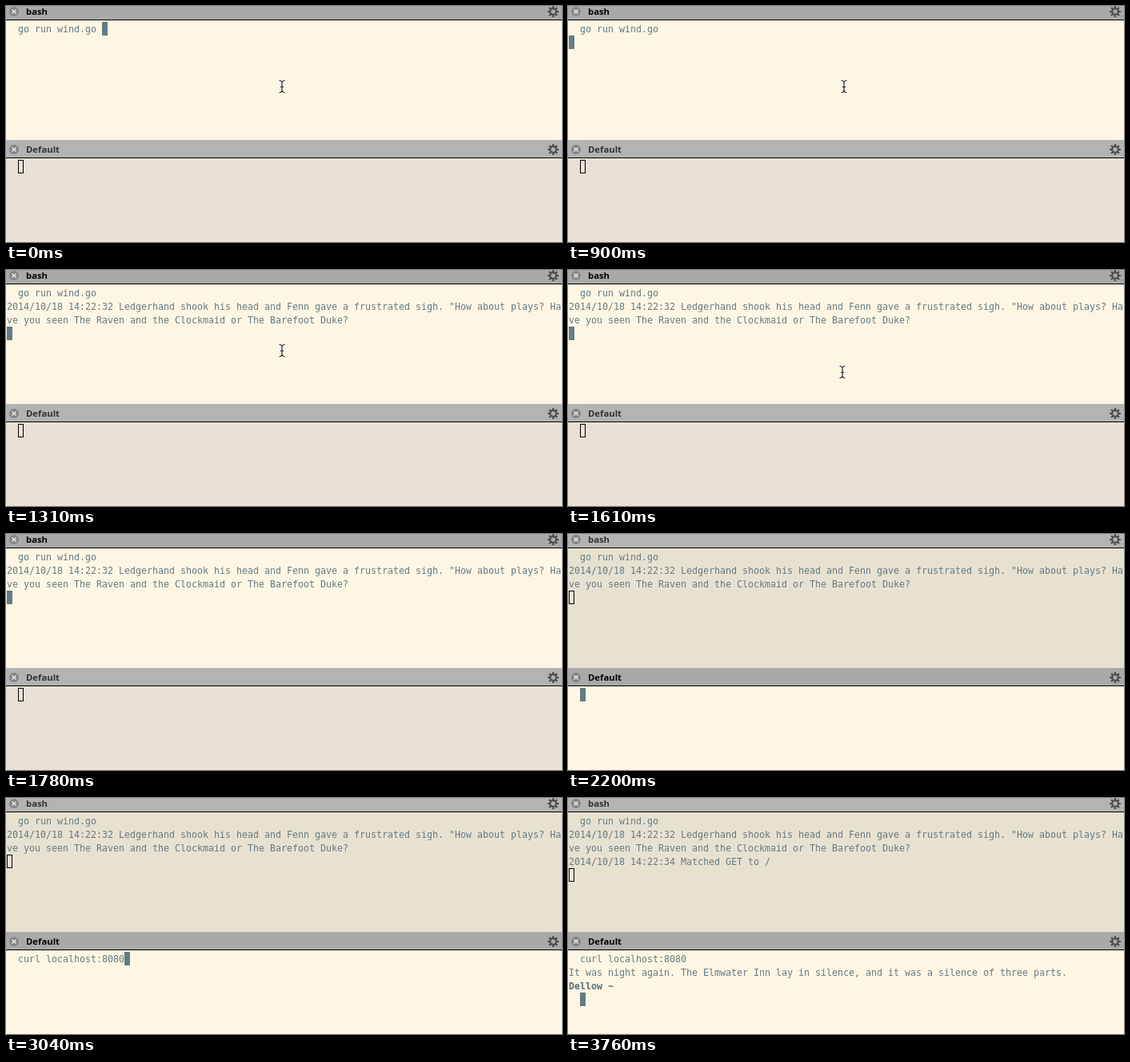
An HTML page with a canvas for the animation above (8.53 s loop, 695 by 296 pixels).

```html
<!DOCTYPE html>
<html lang="en">
<head>
<meta charset="utf-8">
<title>Two terminals</title>
<style>
html, body { margin: 0; width: 100%; height: 100%; overflow: hidden; }
canvas { display: block; }
</style>
</head>
<body>
<canvas id="stage" width="695" height="296"></canvas>
<script>
const LOOP = 8530, WIDTH = 695, CELL = 7, ROW = 17;
const MONO = '11.63px "DejaVu Sans Mono", monospace';
const INK = '#657b83';
const ctx = document.getElementById('stage').getContext('2d');

const LOG = [
  '2014/10/18 14:22:32 Ledgerhand shook his head and Fenn gave a frustrated sigh. "How about plays? Ha',
  've you seen The Raven and the Clockmaid or The Barefoot Duke?'
];
const MATCH = '2014/10/18 14:22:34 Matched GET to /';
const REPLY = 'It was night again. The Elmwater Inn lay in silence, and it was a silence of three parts.';

// Mouse positions by start time; null hides the pointer
const MOUSE = [
  [0, [345, 101]], [1610, [343, 128]], [1667, [339, 205]],
  [1723, [335, 261]], [1780, null]
];

function rect(x, y, w, h, color) {
  ctx.fillStyle = color;
  ctx.fillRect(x, y, w, h);
}

function text(str, x, y, font, color) {
  ctx.font = font;
  ctx.fillStyle = color;
  ctx.fillText(str, x, y);
}

function closeButton(x, y) {
  ctx.fillStyle = '#858585';
  ctx.beginPath();
  ctx.arc(x, y, 6, 0, 7);
  ctx.fill();
  ctx.strokeStyle = '#eee';
  ctx.lineWidth = 1.4;
  ctx.stroke(new Path2D(`M${x - 2.6} ${y - 2.6}l5.2 5.2m0 -5.2l-5.2 5.2`));
}

function gear(x, y) {
  ctx.strokeStyle = '#4c4c4c';
  ctx.lineWidth = 2.2;
  ctx.beginPath();
  ctx.arc(x, y, 3.8, 0, 7);
  for (let i = 0; i < 8; i++) {
    const a = i * Math.PI / 4, c = Math.cos(a), s = Math.sin(a);
    ctx.moveTo(x + 4 * c, y + 4 * s);
    ctx.lineTo(x + 7 * c, y + 7 * s);
  }
  ctx.stroke();
}

function titleBar(top, title, active) {
  rect(0, top, WIDTH, 22, active ? '#a9a9a9' : '#b3b3b3');
  rect(0, top + 22, WIDTH, 1, '#000');
  closeButton(10, top + 12);
  gear(684, top + 12);
  text(title, 25, top + 16, '700 11.3px "Open Sans", sans-serif', active ? '#000' : '#333');
}

function terminal(top, height, title, active, dimColor, lines, col, row) {
  rect(0, top, WIDTH, height, active ? '#fdf6e3' : dimColor);
  titleBar(top, title, active);
  lines.forEach((line, i) => {
    const bold = line.endsWith('~');
    text(line, 1, top + 38 + i * ROW, (bold ? 'bold ' : '') + MONO, bold ? '#586e75' : INK);
  });
  const x = 1 + col * CELL, y = top + 25 + row * ROW;
  if (active) {
    rect(x, y, CELL, ROW, INK);
  } else {
    ctx.strokeStyle = '#000';
    ctx.lineWidth = 1;
    ctx.strokeRect(x + 0.5, y + 0.5, CELL - 1, ROW - 1);
  }
}

function pointer(x, y) {
  const beam = new Path2D(
    `M${x - 3.5} ${y - 7.5}q3.5 0 3.5 3v9q0 3 -3.5 3` +
    `M${x + 3.5} ${y - 7.5}q-3.5 0 -3.5 3v9q0 3 3.5 3M${x - 2} ${y + 0.5}h4`
  );
  for (const [width, color] of [[2.4, '#fff'], [1.2, '#222']]) {
    ctx.lineWidth = width;
    ctx.strokeStyle = color;
    ctx.stroke(beam);
  }
}

function draw() {
  const t = performance.now() % LOOP;
  const lowerActive = t >= 2200, typed = t >= 3040, done = t >= 3760;

  const upper = ['  go run wind.go'];
  if (t >= 1310) upper.push(...LOG);
  if (done) upper.push(MATCH);
  const started = t >= 900;
  terminal(-5, 173, 'bash', !lowerActive, '#e7e1d0', upper,
    started ? 0 : 17, started ? upper.length : 0);

  const lower = typed ? ['  curl localhost:8080'] : [];
  if (done) lower.push(REPLY, 'Dellow ~');
  terminal(168, 128, 'Default', lowerActive, '#e9e1d5', lower,
    typed && !done ? 21 : 2, done ? 3 : 0);

  const spot = MOUSE.filter(([start]) => start <= t).pop()[1];
  if (spot) pointer(...spot);
  requestAnimationFrame(draw);
}
draw();
</script>
</body>
</html>
```
